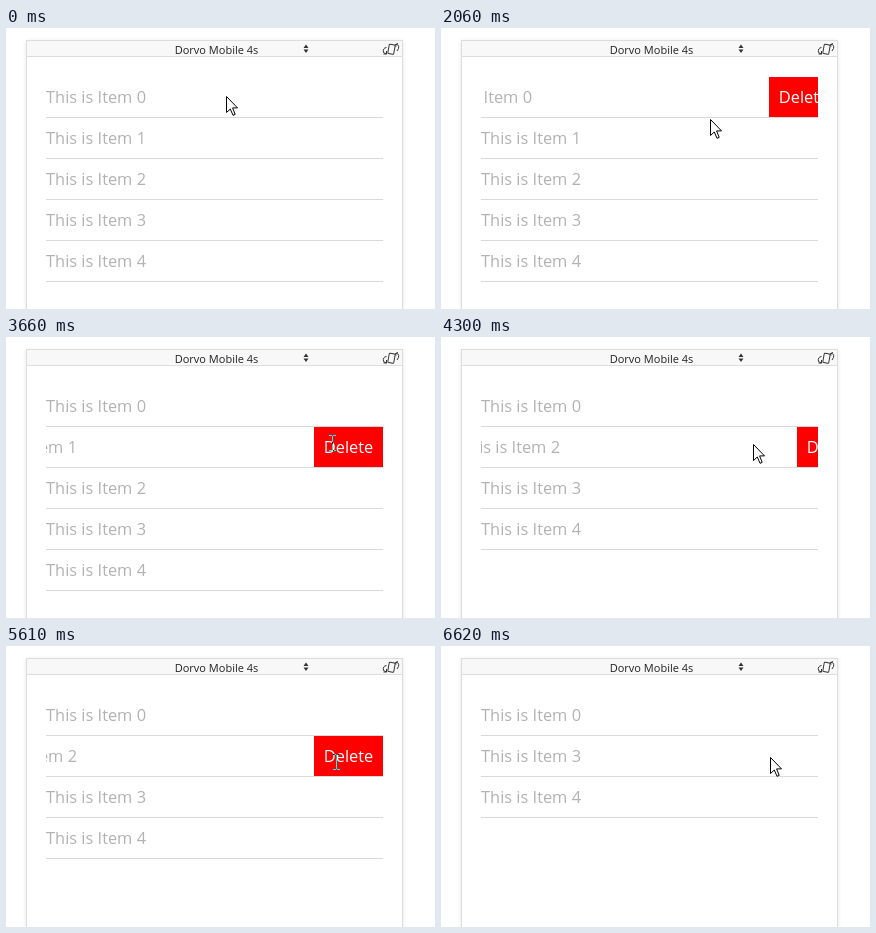
An HTML page for the animation above (7170 ms loop, 429 px wide and 281 px high).

```html
<!DOCTYPE html>
<html lang="en">
<head>
<meta charset="utf-8">
<title>Swipe to delete</title>
<style>
html, body { margin: 0; width: 100%; height: 100%; overflow: hidden; background: #fff; }
body { position: relative; font: 16.4px "Open Sans", "Noto Sans", sans-serif; }
#panel { position: absolute; left: 20px; top: 12px; width: 375px; height: 300px;
  border: 1px solid #ddd; box-shadow: 0 1px 4px rgba(0,0,0,.1); }
#bar { height: 15px; background: #f8f8f8; border-bottom: 1px solid #ddd; }
#device { position: absolute; left: 110.5px; width: 200px; top: 13px; text-align: center;
  font-size: 11px; line-height: 18px; color: #222; white-space: pre; }
svg { position: absolute; left: 0; top: 0; width: 429px; height: 281px; }
#list { position: absolute; left: 40px; top: 49px; width: 337px; }
.row { position: relative; height: 40px; line-height: 40px; overflow: hidden;
  border-bottom: 1px solid #d9d9d9; color: #b2b2b2; white-space: pre; }
.slide { position: relative; }
.del { position: absolute; left: 100%; top: 0; width: 69px; text-align: center;
  background: #f00; color: #fff; }
#pointer path { fill: #fff; stroke: #000; stroke-linejoin: round; }
#pointer.beam { mix-blend-mode: difference; }
#pointer.beam path { fill: none; stroke: #fff; }
</style>
</head>
<body>
<div id="panel"><div id="bar"></div></div>
<div id="device">Dorvo Mobile 4s</div>
<svg fill="none" stroke="#333">
  <path d="M297.5 20L300 16.5 302.5 20zM297.5 21.5L300 25 302.5 21.5z" fill="#333" stroke="none"/>
  <rect x="382.5" y="16.5" width="6" height="9.5" rx="1" transform="rotate(10 385.5 21.2)"/>
  <path d="M380.5 19.5Q376.5 20 377.5 24.5L380.5 26M380.5 23v3h-3M389.5 16.5Q393.5 16 392.5 20.5L391 23M390 18.5l-.5-2 2.5-1"/>
</svg>
<div id="list"></div>
<svg id="pointer"><path/></svg>
<script>
const LOOP = 7170, TICK = 76.7, OPEN = 69, SLIDE = 400, ROW = 41, TOP = 49;

// Times at which a row opens, closes, opens, ...; closing the second row deletes its item
const toggles = [[851, 1992], [2780, 4130, 5110, 6230]];

// Key points of the pointer: time, x, y
const path = [
  [350, 220, 68], [850, 95, 59], [1510, 95, 59], [2071, 269, 91], [2330, 300, 110],
  [2850, 105, 107], [3660, 325, 105], [4200, 325, 105], [4755, 250, 115],
  [5180, 105, 112], [5599, 329, 115], [5770, 329, 111]
];

// Outline and hot spot of each pointer
const pointers = {
  arrow: { x: 0, y: 0, d: 'M.5.5V16.5L4.3 13 7 19.3 9.2 18.4 6.6 11.9H11.5z' },
  hand: { x: 6, y: 1, d: 'M4.8 14V2.7Q4.8.8 6.4.8T8 2.7V8.5Q9.8 7.2 11.2 8.8 13 8 14.2 9.8 16.8 9.2 16.8 12V16.5Q16.8 18.5 15 20.5V23.5H6.5V21L1.2 14.5Q0 12.3 1.5 11.7 3 11.2 4.8 14zM8 8.5v4.5M11.2 9v4M14.2 10v3.5' },
  beam: { x: 2, y: 7, d: 'M0 .5h3M4 .5h3M3.5 1v14M0 15.5h3M4 15.5h3' }
};

const list = document.getElementById('list');
list.innerHTML = '<div class="row"><div class="slide"><span></span><div class="del">Delete</div></div></div>'.repeat(5);
const rows = [...list.children];
const pointer = document.getElementById('pointer'), outline = pointer.firstChild;

// The CSS "ease" curve, solved by bisection
function ease(x) {
  if (x <= 0 || x >= 1) return x <= 0 ? 0 : 1;
  const bezier = (s, a, b) => 3 * a * s * (1 - s) ** 2 + 3 * b * s * s * (1 - s) + s ** 3;
  let s = .5;
  for (let step = .25; step > 1e-5; step /= 2) s += bezier(s, .25, .25) < x ? step : -step;
  return bezier(s, .1, 1);
}

// How far a row is pulled to the left
const offset = (t, row) => Math.round((toggles[row] || []).reduce((sum, start, i) =>
  sum + (i % 2 ? -OPEN : OPEN) * ease((t - start) / SLIDE), 0));

function position(t) {
  const next = path.findIndex(p => p[0] > t);
  if (next < 1) return path.at(next).slice(1);
  const a = path[next - 1], b = path[next], k = (t - a[0]) / (b[0] - a[0]);
  return [1, 2].map(i => Math.round(a[i] + (b[i] - a[i]) * k));
}

// A hand over the item's text, a beam over the button's text, else an arrow
function pointerKind(x, y, t) {
  const row = Math.floor((y - TOP) / ROW), shift = offset(t, row);
  if (Math.abs(y - TOP - ROW * row - 20) > 11) return 'arrow';
  return x <= 140 - shift ? 'hand' : x >= 387 - shift ? 'beam' : 'arrow';
}

function draw(now) {
  const t = TICK * Math.round(now / TICK);
  const deleted = toggles[1].filter((start, i) => i % 2 && start <= now).length;
  rows.forEach((row, i) => {
    row.hidden = i + deleted >= rows.length;
    row.querySelector('span').textContent = `This is Item ${i ? i + deleted : 0}`;
    row.firstChild.style.left = -offset(t, i) + 'px';
  });

  const [x, y] = position(t), kind = pointerKind(x, y, t), shape = pointers[kind];
  pointer.setAttribute('class', kind);
  pointer.style.visibility = now >= 120 && now < 350 ? 'hidden' : 'visible';
  outline.setAttribute('d', shape.d);
  outline.setAttribute('transform', `translate(${x - shape.x} ${y - shape.y})`);
}

const begin = performance.now();
function frame() {
  draw((performance.now() - begin) % LOOP);
  requestAnimationFrame(frame);
}
frame();
</script>
</body>
</html>
```
